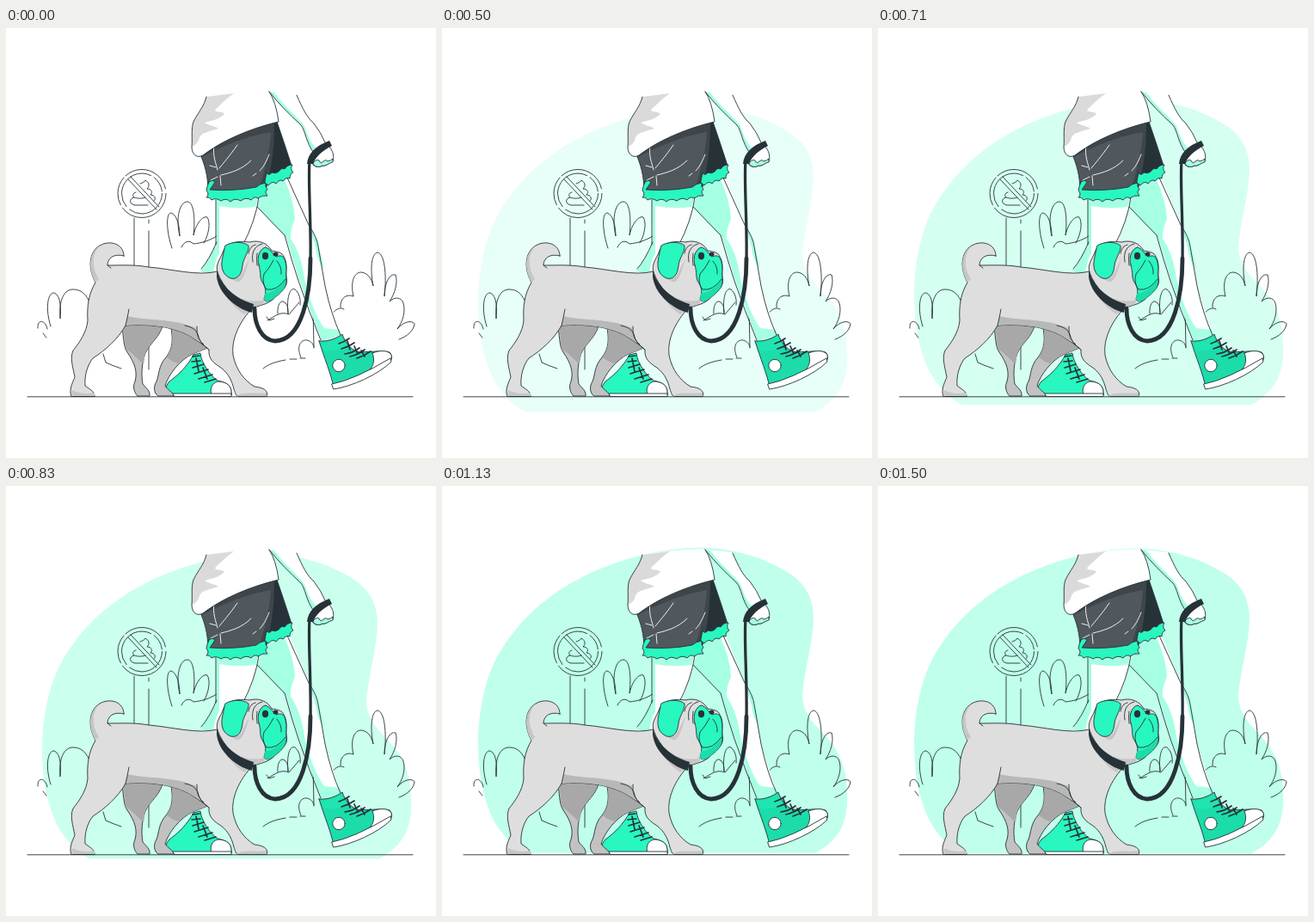
Animation, 500 px wide and 500 px high, one loop 1.54 s. Source, as an HTML page:

```html
<!DOCTYPE html>
<html lang="en">
<head>
<meta charset="utf-8">
<title>Walking the dog</title>
<style>
html, body { margin: 0; width: 100%; height: 100%; overflow: hidden; background: #fff; }
svg { display: block; width: 100vw; height: 100vh; }
path, circle, ellipse { stroke-linejoin: round; stroke-linecap: round; }
.ink { fill: none; stroke: #263238; stroke-width: .9; }
.line { stroke: #263238; stroke-width: .9; }
.white { fill: #fff; }
.dark { fill: #263238; }
.mint { fill: #a6ffe3; }
.green { fill: #28f7c0; }
.teal { fill: #1cdcaa; }
.fur { fill: #dedede; }
.shade { fill: #b8b8b8; }
.furdark { fill: #a8a8a8; }
.strap { fill: none; stroke: #263238; }
.seam { fill: none; stroke: #fff; stroke-width: .9; }
</style>
</head>
<body>
<svg viewBox="0 0 500 500">
  <path id="blob" fill="#c0ffeb" d="M97 428C82 420 70 407 60 390C47 363 42 334 42 300C42 270 48 232 62 204C81 168 110 137 152 113C197 88 252 73 301 73C343 74 374 85 401 101C423 114 432 132 432 155C431 185 422 212 419 244C419 265 433 278 446 292C463 310 471 332 471 358C473 386 465 412 434 428Z"/>

  <g id="bushes" class="ink">
    <path d="M37 349C36 338 46 339 48 350M43 355L47 360M52 347C45 325 49 307 56 308C64 311 64 327 63 338C61 316 68 303 79 304C88 304 94 311 97 319"/>
    <path d="M193 256C186 235 186 215 192 215C199 217 202 231 202 242C197 220 202 202 211 202C219 202 220 225 218 241C221 227 229 218 234 220C238 226 236 240 230 250M204 255C207 248 213 246 218 251C228 250 237 247 245 242"/>
    <path d="M379 333C384 325 390 325 393 327M389 325C388 313 397 309 404 312C400 295 405 284 413 284C421 285 425 291 427 300C423 280 425 262 432 261C440 262 443 286 440 312C440 297 446 285 453 287C456 296 452 309 446 318C452 312 460 313 462 320C465 330 461 342 455 350C461 342 472 339 475 344C474 352 466 359 457 362"/>
    <path d="M303 336L306 340L312 338M316 332C315 322 320 314 325 320C328 323 328 328 328 332C326 314 330 301 336 304C341 308 343 316 342 322M304 340C313 335 319 329 329 333L341 319"/>
    <path d="M299 396C305 391 313 388 325 386M330 385H338M342 384H348M343 383C337 370 343 362 350 363C355 364 358 368 358 372M357 326L358 371"/>
    <path d="M113 379L116 389Q125 393 134 396"/>
  </g>

  <g id="sign" class="ink">
    <path d="M149 221V276M166 223V227M166 236V278M166 350V397"/>
    <circle cx="158" cy="192.500" r="28" stroke-dasharray="70 4 34 3 59 6"/>
    <circle cx="158" cy="192.500" r="23.500" stroke-dasharray="52 5 64 4 19 4"/>
    <path d="M142 176L175 211M145 173L178 208M151 191C147 192 147 195 149 197C143 198 143 205 150 206H165M149 197C154 199 160 198 162 197M156 181C159 180 161 179 162 177C167 180 167 184 164 187C169 187 171 191 168 194C173 194 175 199 172 201"/>
  </g>

  <path class="ink" d="M25 428.800H473"/>

  <g id="far-leg">
    <path class="white" d="M291 206L307 176L327 168L352 228L363 248L371 300L389 357L367 364L340 290L326 244Z"/>
    <path class="mint" d="M291 207L305 182L323 174Q335 200 336 222Q330 235 331 245Q343 262 347 291Q356 330 370 349L388 351L389 357L367 364L340 290L326 244Z"/>
    <path class="mint" d="M352 229L362 246L370 280Q361 270 360 255Z"/>
    <path class="ink" d="M292 208L324 241Q332 270 340 294Q352 329 366 363M327 174L352 229Q362 244 363 254L371 300Q378 333 389 357"/>
  </g>

  <g id="near-leg">
    <path class="white" d="M244 198L294 196Q290 226 275 256L250 300L226 283L246 250Z"/>
    <path class="mint" d="M244 200L293 198L290 208Q267 211 248 207L248 262Q243 270 241 286L226 283L245 252Z"/>
    <path class="ink" d="M244 200V252M294 197Q290 225 275 253M245 249Q236 270 227 280"/>
  </g>

  <g id="far-shoe">
    <path class="teal line" d="M364 364C374 365 384 361 391 356C394 365 400 373 408 376C420 378 436 374 446 377C450 382 449 386 445 390L381 418C378 402 370 384 364 364Z"/>
    <path class="green" d="M366 366C376 366 385 362 390 359L397 370Q386 377 370 375Z" opacity=".35"/>
    <path class="white line" d="M426 378C436 374 445 375 448 380C449 384 447 387 443 389L422 398C428 393 429 385 426 378Z"/>
    <path class="white line" d="M379 414Q405 409 447 384L448 388C433 403 402 417 381 420Z"/>
    <circle class="white line" cx="387" cy="392.500" r="7.200"/>
    <path class="strap" stroke-width="1.700" d="M387 367Q393 365 399 361M390 373Q398 371 405 366M394 379Q403 378 411 372M400 382Q409 380 417 374M408 384Q417 381 424 376M397 364L400 374M405 370L409 379M413 375L417 382"/>
  </g>

  <g id="near-shoe">
    <path class="green line" d="M218 380L226 378C227 389 237 404 246 410C256 412 262 415 262 424V427H192C184 423 184 418 190 411C201 403 211 393 218 380Z"/>
    <path class="white line" d="M239 427C236 418 241 411 248 411C257 412 262 416 262 424V427Z"/>
    <path class="white line" d="M194 425H262V428.500H196Z"/>
    <path class="strap" stroke-width="1.700" d="M217 382L225 381M216 388L226 387M217 395L230 391M219 402L235 397M224 408L240 403M231 412L244 408M221 384L224 399M229 395L234 408"/>
  </g>

  <g id="shorts">
    <path class="dark line" d="M309 112L315 109Q323 132 332 160L303 174L301 150Z"/>
    <path class="line" fill="#50585d" d="M225 145C250 132 283 119 312 110C312 138 309 160 303 185C280 190 258 191 235 190C235 172 231 158 225 145Z"/>
    <path fill="#3e464b" d="M312 110C312 138 309 160 303 185L294 187C302 163 307 141 308 121C279 126 252 137 228 150L225 145C250 132 283 119 312 110Z"/>
    <path class="seam" d="M242 137C240 148 244 157 246 165M249 172L250 183M269 136C260 149 252 158 248 163M244 162L237 160M285 154C274 165 262 168 250 171M246 173L238 177M306 147C302 157 299 162 295 166M291 169L287 172"/>
    <path class="green line" d="M303 169Q307 172 309 168Q314 170 317 167Q320 162 324 164Q327 159 333 159Q330 164 334 168Q330 169 330 175Q326 173 322 178Q318 175 314 181Q310 177 305 183L301 180Z"/>
    <path class="green line" d="M236 179Q240 176 243 179Q240 184 237 188Q265 190 291 185Q295 181 302 180Q301 184 304 188Q300 190 304 195Q298 194 293 198Q289 195 285 200Q279 196 273 201Q266 197 261 202Q256 197 250 201Q244 197 239 200Q237 196 233 197Q237 193 233 189Q234 183 236 179Z"/>
  </g>

  <g id="shirt">
    <path class="white" d="M233 80Q268 74 306 73Q313 85 317 109C283 117 251 131 229 148C222 152 216 147 216 138C216 128 215 117 218 109C224 97 230 92 233 80Z"/>
    <path fill="#dadada" d="M233 80L265 76C256 82 251 88 244 94C240 99 252 96 254 100C247 107 237 108 231 110C236 114 244 114 247 117C238 120 228 121 225 127C224 133 221 136 216 138C216 128 215 117 218 109C224 97 230 92 233 80Z"/>
    <path class="ink" d="M233 80C230 92 224 97 218 109C215 117 217 128 216 138C216 147 222 152 229 148C251 131 283 117 317 109Q314 86 306 74"/>
  </g>

  <g id="arm">
    <path class="white" d="M306 74L337 77C345 94 351 105 359 112C364 119 368 126 371 133L357 145C349 132 348 119 343 113C329 100 317 88 306 74Z"/>
    <path class="mint" d="M306 74L312 75C323 91 340 104 347 114C350 122 353 133 362 141L357 145C349 132 348 119 343 113C329 100 317 88 306 74Z"/>
    <path class="ink" d="M338 78C345 94 350 104 358 111Q366 121 371 133M306 74C317 88 329 100 343 113C348 119 349 133 357 144"/>
    <path class="white line" d="M361 144L375 137C380 142 382 149 380 155C375 157 372 161 368 160C363 163 357 161 356 157C354 152 357 148 361 144Z"/>
    <path class="mint line" d="M357 157Q361 152 364 154Q366 159 369 155Q372 152 374 155Q378 154 380 152L380 156C375 157 372 161 368 160C363 163 358 161 357 157Z"/>
    <path class="dark" d="M350 158C351 146 360 137 376 131L379 137C367 143 360 150 357 158Z"/>
  </g>

  <g id="dog">
    <path class="line" fill="#c2c2c2" d="M134 340C137 358 136 370 141 377C150 390 153 400 150 411C147 417 149 424 153 428H167C168 422 163 419 159 414C157 402 158 389 162 378C168 365 180 360 184 340Z"/>
    <path class="furdark" d="M136 340H183C179 360 168 365 162 378L160 391C152 384 146 377 139 373Z"/>
    <path class="line" fill="#c2c2c2" d="M190 340C196 363 193 374 186 383C177 393 178 404 175 411C171 417 172 425 177 428H195C195 424 188 421 185 416C189 403 202 386 217 379L237 371L223 345Z"/>
    <path class="furdark" d="M191 340C196 363 193 374 187 383Q196 390 201 390Q208 383 217 379L237 371L223 345Z"/>
    <path class="line fur" d="M137 265C137 251 121 246 109 253C96 261 95 279 104 296C96 309 94 324 95 340C94 353 86 365 78 375C74 384 78 395 80 406C77 413 73 421 76 428.500H103C103 422 97 420 92 416C91 404 95 391 101 384C115 375 130 362 139 346C161 344 191 346 212 357C223 364 232 370 236 374C235 385 242 390 250 395C259 402 263 411 265 420C267 425 267 428 271 428.500H303C306 421 298 418 289 417C277 410 267 397 264 380C262 363 270 343 287 325L293 300L246 283C223 289 192 280 166 278C150 275 134 276 118 276C118 267 126 262 137 265Z"/>
    <path class="shade" d="M141 335C165 341 195 337 221 349L225 365L212 357C191 346 161 344 139 346Z"/>
    <path fill="#c6c6c6" d="M110 253C100 261 99 277 108 292L104 296C95 279 96 261 110 253ZM248 291C252 309 263 324 277 333L286 326C268 317 253 304 248 291ZM77 421Q89 427 103 424V428H76ZM269 428C275 422 290 426 303 424L303 428Z"/>
    <path class="ink" d="M143 327Q141 338 139 346M118 276L122 279M208 346Q220 348 223 356Q225 367 236 374M222 347Q221 362 230 368M80 428.500H103"/>
    <path class="line fur" d="M246 284C243 275 249 269 252 261C256 249 270 247 283 249C294 246 304 250 309 259C315 260 322 261 323 266C328 274 325 282 326 290C329 300 320 307 313 313C305 322 295 322 286 326C270 319 252 302 246 284Z"/>
    <path fill="#c6c6c6" d="M263 292Q272 293 277 280L283 268Q279 284 275 291Q270 299 263 292ZM272 314Q286 320 300 316L300 320L287 325Z"/>
    <path class="green line" d="M255 253C263 248 276 248 282 253C283 260 276 267 275 276C274 287 269 293 261 291C252 287 249 279 252 266Z"/>
    <path class="green line" d="M294 276C291 265 296 256 302 255C307 257 309 261 314 266C319 264 323 264 325 272C327 280 325 285 326 292C327 301 320 307 313 313C308 318 301 320 300 315C302 309 303 304 299 297C294 291 297 284 294 276Z"/>
    <path class="teal" d="M301 309Q314 307 325 294C327 301 320 307 313 313C308 318 301 320 300 315Z"/>
    <path class="ink" d="M287 272C285 261 289 253 298 251M282 262C283 256 286 253 290 252M311 270Q306 280 300 286Q297 297 303 304Q315 306 325 292M315 271Q321 278 320 286M292 262Q291 270 292 276"/>
    <ellipse class="dark" cx="301.500" cy="265" rx="3.600" ry="4.200"/>
    <ellipse class="dark" cx="313.500" cy="263" rx="3" ry="2.500"/>
    <path class="dark" d="M245 282C250 300 267 315 288 321L286 331C266 326 247 308 245 289Z"/>
  </g>

  <g id="leash">
    <path class="strap" stroke-width="3.300" d="M353 154C351 183 355 220 354 272"/>
    <path class="strap" stroke-width="4.800" d="M354 268C354 308 345 363 313 364C297 363 289 345 289 326"/>
  </g>
</svg>
<script>
const LOOP = 1540, DELAY = 170, RISE = 30;
const X1 = .36, Y1 = -.01, X2 = .5, Y2 = 1.38;
const blob = document.getElementById('blob');

const bez = (s, a, b) => 3 * (1 - s) ** 2 * s * a + 3 * (1 - s) * s * s * b + s ** 3;

function ease(x) {
  let lo = 0, hi = 1;
  for (let i = 0; i < 24; i++) {
    const mid = (lo + hi) / 2;
    if (bez(mid, X1, X2) < x) lo = mid; else hi = mid;
  }
  return bez(lo, Y1, Y2);
}

function draw(ms) {
  const t = ms % LOOP;
  const y = ease(t / LOOP);
  blob.setAttribute('transform', `translate(0 ${(RISE * (1 - y)).toFixed(3)})`);
  blob.setAttribute('opacity', t < DELAY ? 0 : Math.min(1, Math.max(0, y)));
}

const start = performance.now();
function tick() {
  draw(performance.now() - start);
  requestAnimationFrame(tick);
}
tick();
</script>
</body>
</html>
```
